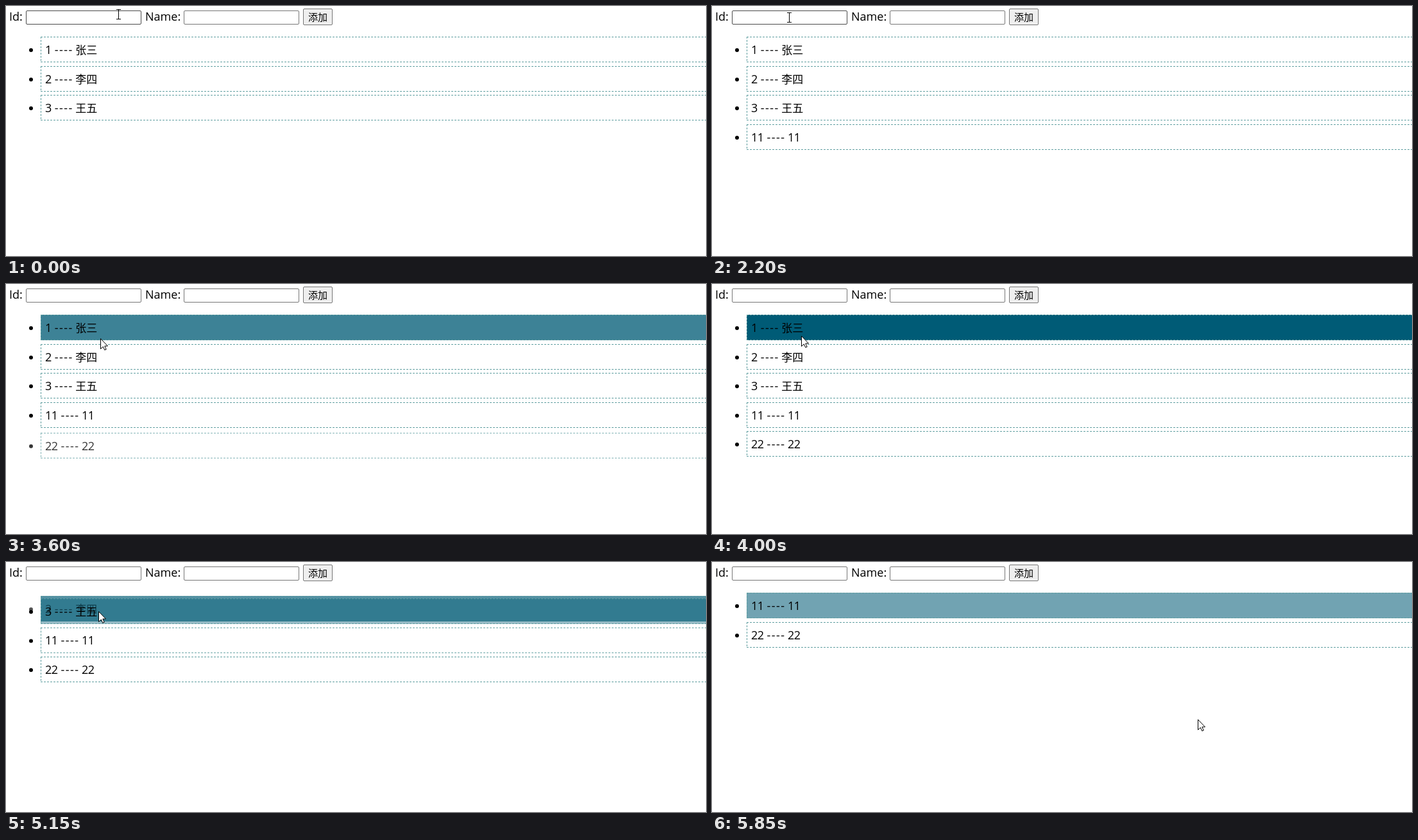
Write an HTML page with a canvas that moves like this. It is 1091 by 391 pixels and loops after 5900 ms.

```html
<!DOCTYPE html>
<html lang="zh">
<head>
<meta charset="utf-8">
<style>
  html, body { margin: 0; height: 100%; overflow: hidden; background: #fff; }
  canvas { display: block; }
</style>
</head>
<body>
<canvas id="stage" width="1091" height="391"></canvas>
<script>
const ctx = document.getElementById('stage').getContext('2d');
const LOOP = 5900, MOVE = 480, HOVER = 640;
const TOP = 48, PITCH = 45.56, HEIGHT = 40;
const UI = '18px "Open Sans", "Noto Sans", sans-serif';
const FIELD = '15px "Liberation Sans", sans-serif';
const HAN = '"Noto Sans CJK SC", "Noto Sans CJK", sans-serif';

const rows = [
  { id: '1', name: '张三', hover: 3305, leave: 4235 },
  { id: '2', name: '李四', hover: 4325, leave: 4910 },
  { id: '3', name: '王五', hover: 4990, leave: 5370 },
  { id: '11', name: '11', add: 1720, hover: 5455 },
  { id: '22', name: '22', add: 3223 }
];

// focus: [from, to]; keys: moments at which a digit appears
const inputs = [
  { x: 31, visits: [
    { focus: [350, 1050], keys: [550, 700], clear: 1720, digit: '1' },
    { focus: [2250, 2800], keys: [2450, 2550], clear: 3223, digit: '2' }] },
  { x: 277, visits: [
    { focus: [1050, 1680], keys: [1200, 1300], clear: 1720, digit: '1' },
    { focus: [2800, 3190], keys: [2900, 2980], clear: 3223, digit: '2' }] }
];
const presses = [1680, 3190];

// time, x, y
const mousePath = [
  [50, 175, 12.5], [200, 148, 14], [700, 148, 14], [900, 356.5, 19],
  [1250, 356.5, 19], [1500, 487, 16], [1750, 487, 16], [2050, 120, 17],
  [2550, 120, 17], [2750, 340, 16], [2980, 340, 16], [3140, 487, 16],
  [3240, 487, 16], [3310, 400, 50], [3600, 147, 85], [3900, 147, 85],
  [4150, 125, 76], [4450, 125, 76], [4800, 144, 77], [5740, 144, 77],
  [5850, 757, 246]
];

const clamp = v => Math.max(0, Math.min(1, v));
const bezier = (a, b, s) => 3 * a * s * (1 - s) ** 2 + 3 * b * s * s * (1 - s) + s ** 3;

// The CSS "ease" curve
function ease(v) {
  if (!(v > 0)) return 0;
  if (v >= 1) return 1;
  let low = 0, high = 1;
  for (let i = 0; i < 18; i++) {
    const mid = (low + high) / 2;
    if (bezier(.25, .25, mid) < v) low = mid; else high = mid;
  }
  return bezier(.1, 1, low);
}

function mouseAt(t) {
  const next = mousePath.findIndex(p => p[0] > t);
  if (next === 0) return mousePath[0].slice(1);
  if (next < 0) return mousePath.at(-1).slice(1);
  const [t0, x0, y0] = mousePath[next - 1], [t1, x1, y1] = mousePath[next];
  const k = (t - t0) / (t1 - t0), s = k * k * (3 - 2 * k);
  return [x0 + (x1 - x0) * s, y0 + (y1 - y0) * s];
}

const inside = ([mx, my], x, y, w, h) => mx >= x && mx < x + w && my >= y && my < y + h;

function label(text, x, y, font = UI, spacing = 0) {
  ctx.font = font;
  ctx.letterSpacing = spacing + 'px';
  ctx.fillStyle = '#000';
  ctx.fillText(text, x, y);
}

function box(x, y, w, h, fill, stroke, line = 1) {
  ctx.beginPath();
  ctx.roundRect(x + line / 2, y + line / 2, w - line, h - line, 1.5);
  ctx.fillStyle = fill;
  ctx.fill();
  ctx.strokeStyle = stroke;
  ctx.lineWidth = line;
  ctx.stroke();
}

function drawInput({ x, visits }, t, mouse) {
  const focused = visits.some(({ focus: [from, to] }) => t >= from && t < to);
  const hovered = inside(mouse, x, 7, 180, 22);
  box(x, 7, 180, 22, '#fff', focused ? '#101010' : hovered ? '#4a4a4a' : '#767676', focused ? 2 : 1);
  let value = '';
  for (const { keys, clear, digit } of visits)
    if (t < clear) value += digit.repeat(keys.filter(k => t >= k).length);
  label(value, x + 3.5, 23, FIELD);
  if (focused) ctx.fillRect(Math.round(x + 3.5 + ctx.measureText(value).width) - 1, 10, 1, 16);
}

function drawButton(t, mouse) {
  const pressed = presses.some(p => t >= p && t < p + 50);
  const hovered = inside(mouse, 463, 4, 46, 26);
  box(463, 4, 46, 26, pressed ? '#f5f5f5' : hovered ? '#e5e5e5' : '#efefef', hovered ? '#4a4a4a' : '#767676');
  label('添加', 471, 23, '300 15px ' + HAN);
}

function drawRowBorder(y) {
  ctx.strokeStyle = '#5f9ea0';
  ctx.lineWidth = 1;
  ctx.setLineDash([3, 2]);
  for (const [x0, y0, x1, y1] of [[54, .5, 1100, .5], [54, HEIGHT - .5, 1100, HEIGHT - .5], [54.5, 0, 54.5, HEIGHT]]) {
    ctx.beginPath();
    ctx.moveTo(x0, y + y0);
    ctx.lineTo(x1, y + y1);
    ctx.stroke();
  }
  ctx.setLineDash([]);
}

function drawRow(row, index, t) {
  if (t < row.add) return;
  const leaving = t >= row.leave, gone = clamp((t - row.leave) / MOVE);
  if (leaving && gone >= 1) return;

  let slot = index;
  for (const other of rows.slice(0, index)) slot -= ease((t - other.leave) / MOVE);
  const entry = row.add ? (t - row.add) / MOVE : 1;
  let y = TOP + PITCH * slot + 90 * (1 - ease(entry));
  if (Number.isInteger(slot) && entry >= 1) y = Math.round(y);
  if (leaving) y = TOP + 5;

  ctx.globalAlpha = leaving ? 1 - gone ** 1.6 : clamp(entry);
  let shade = ease((t - row.hover) / HOVER);
  if (!row.leave && t > 5760) shade = .72 - .16 * (t - 5760) / 90;
  if (row.hover && shade > 0 && t >= row.hover) {
    ctx.fillStyle = `rgba(0, 91, 118, ${shade})`;
    ctx.fillRect(54, y, 1091, HEIGHT);
  }
  drawRowBorder(y);

  const dashes = 66 + 9.8 * row.id.length, base = y + 27;
  label(row.id, 61, base, UI, -.5);
  label('----', dashes, base, UI, 1.4);
  if (/\d/.test(row.name)) label(row.name, dashes + 32.4, base, UI, -.5);
  else label(row.name, dashes + 32.4, base, '300 17px ' + HAN);
  ctx.beginPath();
  ctx.arc(39, y + 21, 3, 0, 7);
  ctx.fill();
  ctx.globalAlpha = 1;
}

const arrow = new Path2D('M.5 .5V16.5L4.3 13L6.8 18.3L9.2 17.2L6.8 12H11.5Z');
const beam = new Path2D('M-3.5 -7H3.5M0 -7V8M-3.5 8H3.5');

function drawMouse(mouse) {
  const [x, y] = mouse.map(Math.floor);
  const overText = inside(mouse, 5, 5, 452, 25);
  ctx.save();
  ctx.translate(x + (overText ? .5 : 0), y + (overText ? .5 : 0));
  ctx.strokeStyle = '#000';
  ctx.lineWidth = 1;
  if (!overText) {
    ctx.fillStyle = '#fff';
    ctx.fill(arrow);
  }
  ctx.stroke(overText ? beam : arrow);
  ctx.restore();
}

function draw() {
  const t = performance.now() % LOOP, mouse = mouseAt(t);
  ctx.fillStyle = '#fff';
  ctx.fillRect(0, 0, 1091, 391);
  label('Id:', 5, 23);
  label('Name:', 217, 23);
  inputs.forEach(input => drawInput(input, t, mouse));
  drawButton(t, mouse);
  rows.forEach((row, i) => drawRow(row, i, t));
  drawMouse(mouse);
  requestAnimationFrame(draw);
}
draw();
</script>
</body>
</html>
```
